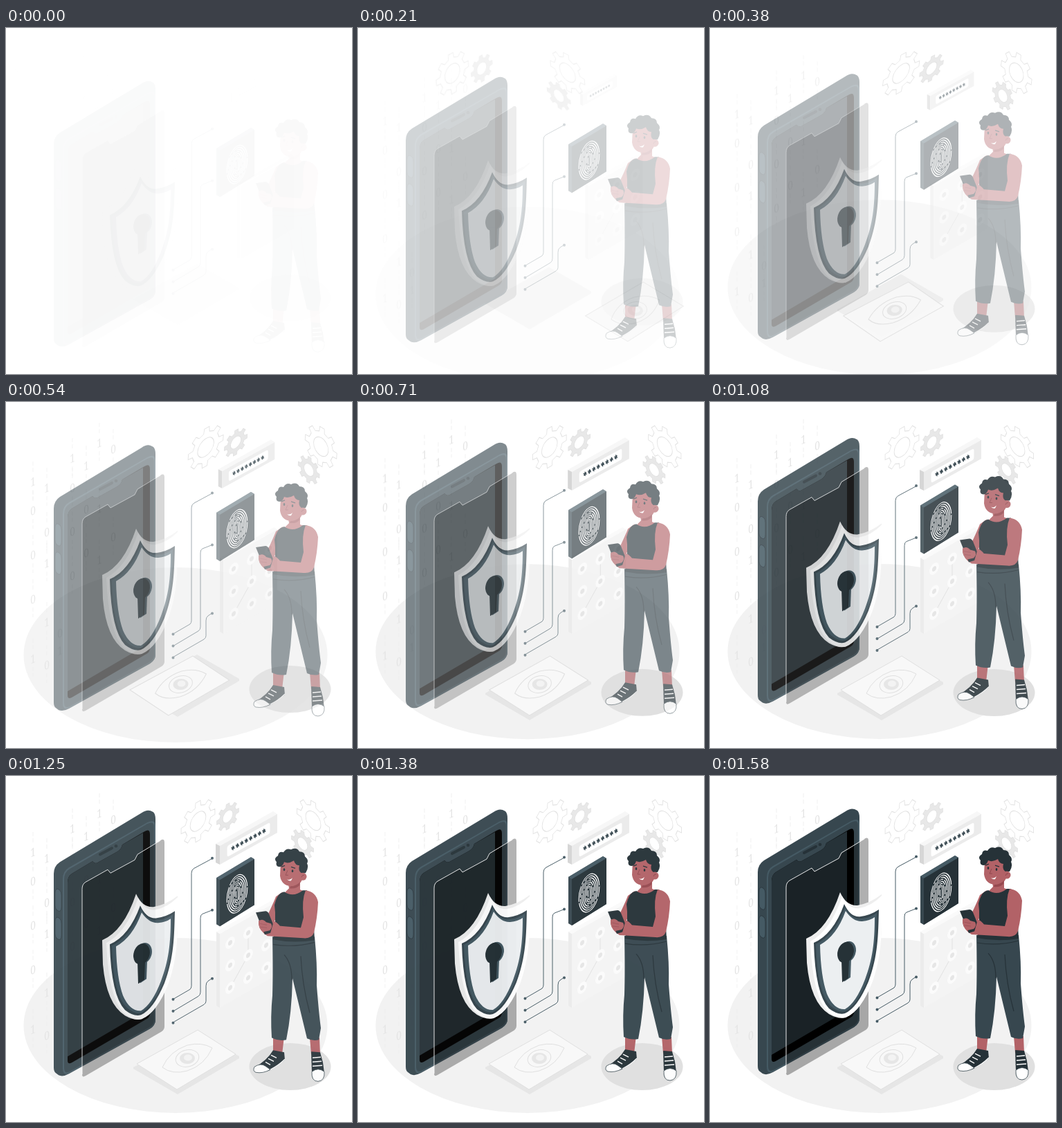
Animation, 500 px wide and 500 px high, one loop 1.62 s. Source, as an HTML page:

```html
<!DOCTYPE html>
<html lang="en">
<head>
<meta charset="utf-8">
<title>Mobile security</title>
<style>
  html, body { margin: 0; width: 100%; height: 100%; overflow: hidden; background: #fff; }
  svg { display: block; width: 100%; height: 100%; }
  text { font: 17px "Noto Serif", "Liberation Serif", serif; text-anchor: middle; fill: #e4e4e4; }
</style>
</head>
<body>
<svg viewBox="0 0 500 500">
  <g data-move="up"><ellipse cx="245" cy="360.5" rx="219.5" ry="126.5" fill="#f2f2f2"/></g>
  <g data-move="up" id="digits"></g>
  <g data-move="fromLeft" id="gears"></g>
  <g data-move="down">
    <ellipse cx="410.500" cy="420" rx="59" ry="34" fill="#e0e0e0"/>
    <path d="M184 421 276 370 337 405V408L248 460 184 423Z" fill="#e6e6e6"/>
  </g>
  <g data-move="fromRight" stroke="#e0e0e0" fill="none">
    <path d="M189 416 277 367 332 402 247 453Z" fill="#f8f8f8"/>
    <path d="M226 421Q236 398 262 389 283 384 298 393 287 418 262 426 240 432 226 421Z"/>
    <ellipse cx="262" cy="408" rx="17" ry="12" transform="rotate(-14 262 408)"/>
    <ellipse cx="262" cy="408" rx="11" ry="8" fill="#e6e6e6" stroke="none"/>
    <ellipse cx="263" cy="407" rx="6" ry="4.500" fill="#f3f3f3" stroke="none"/>
  </g>
  <g data-move="left" id="pattern">
    <path d="M304 225 309 228V335L304 332Z" fill="#ebebeb"/>
    <path d="M304 225 382 181 387 184 309 228Z" fill="#fafafa"/>
    <path d="M309 228 387 184V290L309 335Z" fill="#f4f4f4"/>
    <path d="M350 227V259L324 306" fill="none" stroke="#e2e2e2"/>
  </g>

  <g data-move="main">
    <path d="M69 139Q69 128 78 122L196 51Q203 46 209 48L213 50Q216 53 216 60V350Q216 358 208 363L91 428Q82 433 76 430L72 427Q69 425 69 419Z" fill="#37474f"/>
    <path d="M82 147Q82 135 91 130L204 65Q216 59 216 70V350Q216 358 208 363L92 427Q82 432 82 420Z" fill="#455a64"/>
    <path d="M84 147Q84 137 92 132L204 67Q214 62 214 71V350Q214 357 207 361L92 425Q84 429 84 419Z" fill="#37474f"/>
    <path d="M89 152Q89 143 95 139L125 121Q129 126 134 122L161 107Q167 103 168 97L200 78Q208 73 208 82V341Q208 346 203 349L95 412Q89 415 89 409Z"/>
    <path d="M89 152Q89 143 95 139L125 121Q129 126 134 122L161 107Q167 103 168 97L198 80V339L89 403Z" fill="#263238"/>
    <path d="M136 111 153 102" stroke="#263238" stroke-width="4" stroke-linecap="round"/>
    <circle cx="159" cy="99" r="2.300" fill="#263238"/>
    <g fill="#455a64" stroke="#263238" stroke-width=".7">
      <path id="key" d="M71 167Q71 160 75 161L78 163Q80 165 80 170V187Q80 194 76 193L73 191Q71 189 71 185Z"/>
      <use href="#key" y="41"/>
    </g>
  </g>

  <g data-move="main">
    <path d="M110 429V161Q110 154 115 151L147 133 151 138 186 119 190 111 223 91Q229 87 229 94V360Q229 364 225 367L115 431Q110 434 110 429Z" opacity=".31"/>
    <path d="M110 429V161Q110 154 115 151L147 133 151 138 186 119 190 111 223 91" fill="none" stroke="#fff" stroke-width=".9"/>
  </g>

  <g data-move="main">
    <path d="M139 235Q170 222 188 168 197 188 213 187 231 184 248 171C248 215 250 255 235 297Q218 340 196 349 186 352 172 344 145 327 140 270Z" fill="#eee"/>
    <path d="M145 239Q174 224 191 174 201 193 216 191 233 188 248 173C248 215 250 255 235 297Q218 340 196 349 186 351 174 343 149 326 145 239Z" fill="#fff"/>
    <path d="M150 241Q178 229 194 185 203 205 218 203 232 201 244 193C243 230 243 260 229 297Q213 335 195 343 185 346 172 336 152 315 150 241Z" fill="#37474f"/>
    <path d="M153 243Q180 230 195 190 205 208 219 206 232 205 241 198C240 235 239 262 227 296Q212 332 195 340 186 342 175 333 155 315 153 243Z" fill="#455a64"/>
    <path d="M159 244Q183 231 196 195 207 211 220 210 231 209 238 204C238 240 235 265 224 294Q211 328 195 337 179 338 169 315 160 290 159 244Z" fill="#eceff1"/>
    <g id="hole" fill="#455a64">
      <ellipse cx="199" cy="254" rx="11.500" ry="15.500" transform="rotate(18 199 254)"/>
      <path d="M193 264H204L203 291 194 297Z"/>
    </g>
    <use href="#hole" x="-3" y="1" style="filter:brightness(.55)"/>
  </g>

  <g data-move="main" fill="none" stroke="#455a64">
    <path d="M241 320.500 266 306Q268 304 268 301V138Q268 133 272 131L298 117M241 338 278 316Q281 314 281 310V203Q281 198 284 197L298 191.500M241 354 286 328Q289 326 289 323V301Q289 296 292 294L298 290"/>
    <path d="M241.500 320.500h.01M241.500 337.500h.01M241.500 354.500h.01M298 116.500h.01M298 191.500h.01M298 290.500h.01" stroke-width="4" stroke-linecap="round"/>
  </g>

  <g data-move="main">
    <path d="M304 145 354 115 359 118V184L309 215 304 212Z" fill="#37474f"/>
    <path d="M304 145 354 115 359 118 309 148Z" fill="#455a64"/>
    <path d="M309 148 359 118V184L309 215Z" fill="#263238"/>
    <g id="print" fill="none" stroke="#fff" stroke-width="1.100" transform="matrix(1 -.57 0 1 334 168)"></g>
  </g>

  <g data-move="zoom" id="password">
    <path d="M303 98 386 51 392 55 309 101Z" fill="#f7f7f7"/>
    <path d="M303 98 309 101V128L303 125Z" fill="#d6d6d6"/>
    <path d="M309 101 392 55V82L309 128Z" fill="#ebebeb"/>
    <rect x="-31" y="-8" width="62" height="16" rx="3" fill="#fff" transform="matrix(1 -.55 0 1 350.500 92)"/>
  </g>

  <g data-move="main">
    <g fill="#b26267">
      <path d="M386 374H402L399 400H386ZM439 376H453L454 400H441Z"/>
      <path d="M400 165 390 172Q385 185 372 211L382 219 394 196Z"/>
      <path d="M407 148H425V162L433 165Q414 178 402 167L409 160Z"/>
    </g>
    <path d="M385 230H446Q450 270 449 300 452 340 455 362L452 379Q443 381 435 377L414 290Q413 340 405 379 394 381 384 376 382 345 385 315 386 280 385 230Z" fill="#37474f"/>
    <path d="M413 292Q413 268 402 256M426 258Q428 300 439 340M386 241Q416 246 446 238" fill="none" stroke="#263238" stroke-width="1.200"/>
    <path d="M397 167 402 165Q415 174 429 163L435 163 444 200 446 235Q415 240 386 234 391 205 388 184 391 171 397 167Z" fill="#263238"/>
    <path d="M433 163Q448 165 451 180 450 203 445 224 442 233 430 232L396 230 378 229Q366 222 365 211 370 203 377 207 387 205 391 214L426 217 430 202Q427 177 433 163Z" fill="#b26267"/>
    <path d="M361 195 375 193Q378 193 380 197L390 222 374 227Z" fill="#263238"/>
    <path d="M365 207Q371 203 376 209L383 211Q386 216 381 221L372 223Q364 218 365 207ZM387 207Q396 212 398 219L393 229 382 225Z" fill="#b26267"/>
    <path d="M367 211 377 213M368 216 377 217" stroke="#9a4f56" stroke-width=".8"/>

    <path d="M397 121Q412 111 428 126L431 140Q425 160 412 157 398 156 396 142Z" fill="#b26267"/>
    <path d="M411 157Q419 157 425 151L424 156Q419 161 410 160Z" fill="#96494f"/>
    <path d="M396 129Q389 129 391 122 386 117 393 113 394 106 401 108 405 101 412 104 420 100 424 107 432 107 432 114 438 119 435 124 438 130 433 138L427 138Q422 135 424 127 418 127 416 120 408 125 402 122 400 128 396 129Z" fill="#263238"/>
    <circle cx="429" cy="143" r="5.500" fill="#b26267"/>
    <path d="M427 144Q428 140 431 141" fill="none" stroke="#8d444b"/>
    <g fill="#263238"><ellipse cx="402" cy="133" rx="1.300" ry="2"/><ellipse cx="414" cy="135" rx="1.300" ry="2"/></g>
    <path d="M398 129 403 127M412 129 418 131" stroke="#263238" stroke-width="1.300"/>
    <path d="M407 134 404 141 408 141" fill="none" stroke="#8d444b" stroke-width=".9"/>
    <path d="M406 147Q410 149 414 145L412 149Q409 150 406 147Z" fill="#fff"/>

    <path d="M386 394 402 397 403 408Q397 413 390 418 377 427 363 426 356 424 359 419 378 408 386 394ZM441 396 454 397 458 412 460 427Q459 438 451 439 441 438 442 427Z" fill="#263238"/>
    <path d="M359 418Q368 412 375 417L382 422Q371 428 361 426 356 424 359 418ZM442 425Q451 418 460 425 461 438 451 439 441 439 442 425Z" fill="#fff" stroke="#37474f" stroke-width=".8"/>
    <path d="M383 401 391 405M379 406 387 410M375 411 382 415M443 405 455 404M443 411 456 410M443 417 457 416" stroke="#fff" stroke-width="1.400"/>
    <path d="M382 422Q394 416 403 407" fill="none" stroke="#fff" stroke-width="1.300"/>
  </g>
</svg>
<script>
const LOOP = 1620;
const $ = id => document.getElementById(id);
const add = (id, markup) => $(id).insertAdjacentHTML('beforeend', markup);
const lerp = (a, b, p) => a + (b - a) * p;
const clamp = p => Math.min(1, Math.max(0, p));

// Binary rain: [column x, character, baseline y]
const rain = [
  [39, 1, 116], [39, 0, 158], [39, 0, 222], [39, 0, 286], [39, 1, 372],
  [59, 1, 125], [59, 0, 189], [59, 1, 234], [59, 1, 319], [59, 0, 381],
  [96, 1, 82], [96, 0, 125], [96, 0, 188], [96, 0, 252], [116, 1, 93],
  [116, 0, 156], [116, 0, 219], [135, 1, 60], [135, 1, 155], [135, 1, 229],
  [155, 0, 69], [155, 0, 196], [78, 0, 335], [78, 1, 360]
];
rain.forEach(([x, digit, y]) => add('digits',
  `<text transform="matrix(.8 -.3 0 1 ${x} ${y})">${digit}</text>
   <path d="M${x} ${y - 20}v-18M${x} ${y + 6}v14" stroke="#eee" stroke-width=".8" stroke-dasharray="6 3"/>`));

// Isometric cogwheel; slope sets which way its face turns
function gear(x, y, r, slope, solid) {
  const teeth = 8, points = [];
  for (let i = 0; i < teeth; i++)
    [[-.31, .76], [-.2, 1], [.2, 1], [.31, .76]].forEach(([offset, k]) => {
      const a = (i + offset * .9) * 2 * Math.PI / teeth;
      points.push(`${(r * k * Math.cos(a)).toFixed(1)} ${(r * k * Math.sin(a)).toFixed(1)}`);
    });
  add('gears', `<g transform="matrix(.866 ${slope} 0 1 ${x} ${y})" stroke="#e2e2e2">
    <path d="M${points.join(' ')}Z" fill="${solid ? '#e8e8e8' : '#fff'}"/>
    <circle r="${r * .46}" fill="#fff"/></g>`);
}
gear(277.5, 65.5, 28.5, -.5, false);
gear(320.5, 58.5, 18.5, -.5, true);
gear(444, 64.5, 27.5, .5, false);
gear(428.5, 98, 18.5, .5, true);

for (let col = 0; col < 3; col++)
  for (let row = 0; row < 3; row++)
    add('pattern', `<g transform="matrix(.866 -.5 0 1 ${324 + 26 * col} ${241 - 14.5 * col + 32.5 * row})">
      <circle r="8" fill="#fbfbfb"/><circle r="3.5" fill="#e6e6e6"/></g>`);

for (let i = 0; i < 8; i++)
  add('password', `<path transform="translate(${328 + 6.4 * i} ${104 - 3.5 * i})"
    d="M0-3.200V3.200M-2.500-.5 2.500.5M-1.800 2.200 1.800-2.200" stroke="#37474f" stroke-width="1.300"/>`);

for (let i = 0; i < 7; i++) {
  const rx = 1.6 + 2.2 * i;
  add('print', `<ellipse rx="${rx}" ry="${rx * 1.25 + 8}" stroke-dasharray="${14 + 5 * i} 2 ${9 + 2 * i} 2.500"
    stroke-dashoffset="${i * 9}"/>`);
}

// Cubic Bezier easing through (x1, 0) and (x2, 1)
function bezier(x1, x2, x) {
  let lo = 0, hi = 1, s;
  for (let i = 0; i < 24; i++) {
    s = (lo + hi) / 2;
    if (3 * s * (1 - s) * ((1 - s) * x1 + s * x2) + s ** 3 < x) lo = s; else hi = s;
  }
  return 3 * s * s * (1 - s) + s ** 3;
}

// Rush in sideways, leaning over and swaying back about the stage centre
function rush(t, side) {
  const p = clamp(t / 422);
  const lean = t < 422 ? lerp(20, -10, p)
    : t < 640 ? lerp(-10, 2, (t - 422) / 218)
    : lerp(2, 0, clamp((t - 640) / 80));
  return [`translate(${side * 250 * (1 - p) + 250} 250) skewX(${lean}) translate(-250 -250)`, p];
}

function pose(t) {
  const slow = bezier(0, .58, clamp((t + 25) / (LOOP + 25)));
  const quick = bezier(.42, .58, clamp((t + 25) / 790));
  const gap = 30 * (1 - quick);
  return {
    main: [`translate(0 ${30 * (1 - slow)})`, slow],
    up: [`translate(0 ${gap})`, quick],
    down: [`translate(0 ${-gap})`, quick],
    left: [`translate(${gap} 0)`, quick],
    zoom: [`translate(348 89.500) scale(${lerp(.5, 1, quick)}) translate(-348 -89.500)`, quick],
    fromLeft: rush(t, -1),
    fromRight: rush(t, 1)
  };
}

const parts = document.querySelectorAll('[data-move]');
function draw() {
  const poses = pose(performance.now() % LOOP);
  parts.forEach(part => {
    const [transform, opacity] = poses[part.dataset.move];
    part.setAttribute('transform', transform);
    part.setAttribute('opacity', opacity);
  });
  requestAnimationFrame(draw);
}
draw();
</script>
</body>
</html>
```
